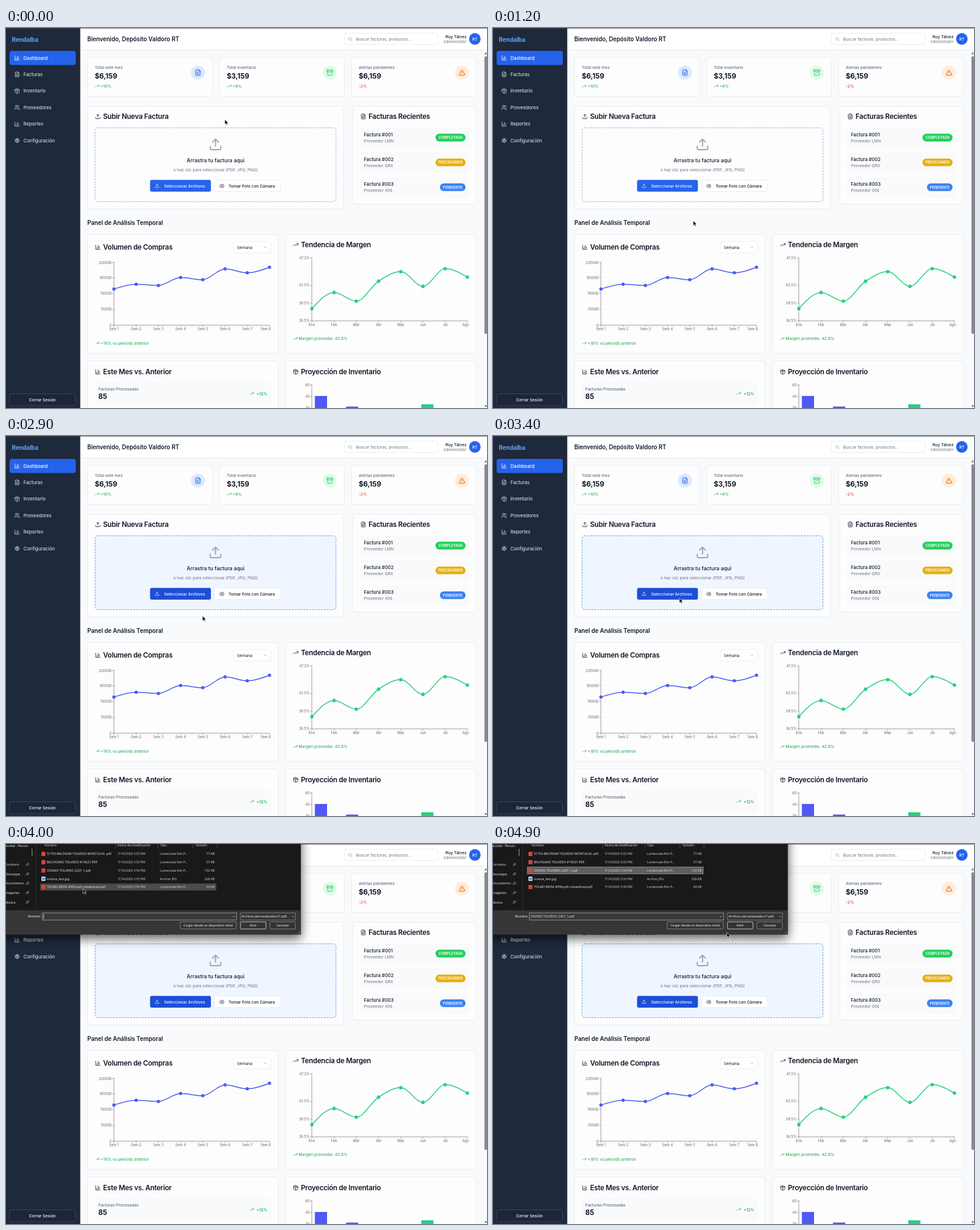
These frames come from a looping animation (800x631 px, 5 s). An HTML page:

```html
<!DOCTYPE html>
<html lang="es">
<head>
<meta charset="utf-8">
<title>Panel</title>
<style>
html, body { margin: 0; width: 100%; height: 100%; overflow: hidden; background: #f9fafb; }
svg { display: block; width: 100vw; height: 100vh; font-family: Inter, sans-serif; }
text { white-space: pre; }
#dialog { font-family: "Open Sans", "Noto Sans", sans-serif; transform-origin: 165px 20px; }
#frame { filter: drop-shadow(0 6px 9px rgba(0, 0, 0, .65)); }
</style>
</head>
<body>
<svg id="stage" viewBox="0 0 800 631"></svg>
<script>
const XS = 5.79, SM = 6.75, MD = 7.72, LG = 8.68, XL = 9.7, H = 11.58;
const INK = '#111827', GRAY = '#6b7280', LINE = '#e5e7eb', BLUE = '#2563eb', GREEN = '#16a34a';
const SERIES_BLUE = '#4a5cf0', SERIES_GREEN = '#2bd07f';

const ICONS = {
  bars: 'M3 3v18h18M18 17V9M13 17V5M8 17v-3',
  file: 'M15 2H6a2 2 0 0 0-2 2v16a2 2 0 0 0 2 2h12a2 2 0 0 0 2-2V7zM14 2v5h6M16 13H8M16 17H8M10 9H8',
  box: 'M12 22l-9-5V7l9-5 9 5v10zM3 7l9 5 9-5M12 22V12M7.5 4.3l9 5',
  users: 'M16 21v-2a4 4 0 0 0-4-4H6a4 4 0 0 0-4 4v2M13 7a4 4 0 1 1-8 0 4 4 0 0 1 8 0zM22 21v-2a4 4 0 0 0-3-3.9M16 3.1a4 4 0 0 1 0 7.8',
  gear: 'M12 9a3 3 0 1 0 0 6 3 3 0 0 0 0-6zM12 5a7 7 0 1 0 0 14 7 7 0 0 0 0-14zM12 2v3M12 19v3M2 12h3M19 12h3M5 5l2 2M17 17l2 2M5 19l2-2M17 7l2-2',
  upload: 'M21 15v4a2 2 0 0 1-2 2H5a2 2 0 0 1-2-2v-4M17 8l-5-5-5 5M12 3v12',
  camera: 'M14.5 4h-5L7 7H4a2 2 0 0 0-2 2v9a2 2 0 0 0 2 2h16a2 2 0 0 0 2-2V9a2 2 0 0 0-2-2h-3zM15 13a3 3 0 1 1-6 0 3 3 0 0 1 6 0z',
  archive: 'M2 3h20v5H2zM4 8v11a2 2 0 0 0 2 2h12a2 2 0 0 0 2-2V8M10 12h4',
  alert: 'M21.7 18l-8-14a2 2 0 0 0-3.5 0l-8 14A2 2 0 0 0 4 21h16a2 2 0 0 0 1.7-3zM12 9v4M12 17h0',
  trend: 'M22 7l-8.5 8.5-5-5L2 17M16 7h6v6',
  search: 'M19 11a8 8 0 1 1-16 0 8 8 0 0 1 16 0zM21 21l-4.3-4.3',
  down: 'M6 9l6 6 6-6'
};

const rect = (x, y, w, h, fill, stroke = 'none', r = 0, more = '') =>
  `<rect x="${x}" y="${y}" width="${w}" height="${h}" rx="${r}" fill="${fill}" stroke="${stroke}" ${more}/>`;
const text = (x, y, s, size, fill = INK, weight = 400, anchor = 'start', more = '') =>
  `<text x="${x}" y="${y}" font-size="${size}" fill="${fill}" font-weight="${weight}" text-anchor="${anchor}" ${more}>${s}</text>`;
const icon = (name, cx, cy, size, color) =>
  `<path d="${ICONS[name]}" transform="translate(${cx - size / 2} ${cy - size / 2}) scale(${size / 24})" fill="none" stroke="${color}" stroke-width="2" stroke-linecap="round" stroke-linejoin="round"/>`;
const line = (d, color, width = .6, more = '') =>
  `<path d="${d}" fill="none" stroke="${color}" stroke-width="${width}" ${more}/>`;
const dot = (x, y, r, fill) => `<circle cx="${x}" cy="${y}" r="${r}" fill="${fill}"/>`;
const card = (x, y, w, h) => rect(x, y, w, h, '#fdfdfe', LINE, 4, 'stroke-width=".8"');
const title = (x, y, s, name) =>
  icon(name, x + 4.8, y - 4, 9.65, INK) + text(x + 13.6, y, s, H, INK, 600, 'start', 'letter-spacing="-.25"');
const trend = (x, y, s) => icon('trend', x + 3.9, y - 2.4, 7.7, GREEN) + text(x + 9.6, y, s, SM, GREEN);

// Monotone cubic through evenly spaced points
function curve(xs, ys) {
  const n = ys.length, h = xs[1] - xs[0];
  const slope = ys.slice(1).map((y, i) => (y - ys[i]) / h);
  const m = ys.map((_, i) => {
    if (!i || i === n - 1) return 0;
    const a = slope[i - 1], b = slope[i];
    return a * b <= 0 ? 0 : Math.sign(a) * Math.min(Math.abs(a), Math.abs(b), Math.abs(a + b) / 4) * 2;
  });
  m[0] = (3 * slope[0] - m[1]) / 2;
  m[n - 1] = (3 * slope[n - 2] - m[n - 2]) / 2;
  let d = `M${xs[0]} ${ys[0]}`;
  for (let i = 1; i < n; i++) {
    d += `C${xs[i - 1] + h / 3} ${ys[i - 1] + m[i - 1] * h / 3} ${xs[i] - h / 3} ${ys[i] - m[i] * h / 3} ${xs[i]} ${ys[i]}`;
  }
  return d;
}

function chart({ x, top, base, ticks, labels, ys, color, r, lastShift }) {
  const xs = ys.map((_, i) => x + i * 36.96), right = xs[xs.length - 1];
  let s = '';
  for (const gx of xs.slice(1)) s += line(`M${gx} ${top}V${base}`, '#efeff1', .5, 'stroke-dasharray="1.5 1.5"');
  for (const [v, y] of ticks) {
    if (y < base - 2) s += line(`M${x} ${y}H${right}`, '#efeff1', .5, 'stroke-dasharray="1.5 1.5"');
    s += line(`M${x - 3} ${y}H${x}`, '#777') + text(x - 3.8, y + 2.1, v, XS, '#666', 400, 'end');
  }
  s += line(`M${x} ${top}V${base}H${right}`, '#777', .7);
  xs.forEach((px, i) => {
    s += line(`M${px} ${base}v3`, '#777');
    s += text(px - (i === 7 ? lastShift : 0), base + 8.4, labels[i], XS, '#666', 400, 'middle');
  });
  s += line(curve(xs, ys), color, 1.5);
  xs.forEach((px, i) => s += dot(px, ys[i], r, color));
  return s;
}

function sidebar() {
  const items = [['Dashboard', 'bars'], ['Facturas', 'file'], ['Inventario', 'box'],
    ['Proveedores', 'users'], ['Reportes', 'bars'], ['Configuración', 'gear']];
  let s = rect(0, 0, 123.5, 631, '#1e293b') + text(9.7, 22.6, 'Rendalba', XL, '#60a5fa', 700);
  s += rect(6, 38, 110, 23.4, BLUE, 'none', 4);
  items.forEach(([name, ic], i) => {
    const y = 49.7 + i * 27.43, c = i ? '#d1d5db' : '#fff';
    s += icon(ic, 18.5, y, 9.65, c) + text(29, y + 2.8, name, MD, c, 500);
  });
  return s + rect(6, 607.5, 109.5, 19.5, '#1c2638', '#475569', 3.5, 'stroke-width=".7"')
    + text(60.7, 619.7, 'Cerrar Sesión', SM, '#fff', 500, 'middle');
}

function header() {
  return rect(123.5, 0, 676.5, 36.5, '#fff') + line('M123.5 36.5H800', LINE, .7)
    + text(135.3, 21.6, 'Bienvenido, Depósito Valdoro RT', XL, INK, 600)
    + rect(562.5, 8.5, 156, 19, '#fff', '#dfe3e8', 4, 'stroke-width=".7"')
    + icon('search', 572.2, 18.2, 7.7, '#9ca3af')
    + text(582.3, 20.7, 'Buscar facturas, productos...', SM, GRAY)
    + text(766, 16.9, 'Ruy Tálvez', SM, INK, 500, 'end')
    + text(766, 25.2, 'Administrador', XS, GRAY, 400, 'end')
    + dot(779.8, 18.1, 9.6, BLUE) + text(779.8, 20.6, 'RT', SM, '#fff', 500, 'middle');
}

function stats() {
  const list = [
    [135.5, 'Total este mes', '$6,159', '+10%', '#dbeafe', 'file', BLUE],
    [355, 'Total inventario', '$3,159', '+8%', '#dcfce7', 'archive', '#22c55e'],
    [574.5, 'Alertas pendientes', '$6,159', '', '#ffedd5', 'alert', '#e2571a']];
  return list.map(([x, label, value, up, tint, ic, color]) =>
    card(x, 48.5, 207.8, 65) + text(x + 12.2, 67.6, label, SM, '#4b5563')
    + text(x + 12.2, 83.6, value, H, INK, 700)
    + (up ? trend(x + 12.2, 99, up) : text(x + 12.2, 99, '-2%', SM, '#dc2626'))
    + dot(x + 183.7, 74, 11.6, tint) + icon(ic, x + 183.7, 74, 11.6, color)).join('');
}

function upload() {
  return card(135.5, 129.5, 425.8, 171) + title(148, 151, 'Subir Nueva Factura', 'upload')
    + rect(148.2, 165.7, 400.6, 122.6, 'none', '#8db4d9', 4, 'id="zone" stroke-dasharray="2.9 1.9"')
    + icon('upload', 348.5, 193.3, 23.2, '#9ca3af')
    + text(348.5, 222.8, 'Arrastra tu factura aquí', LG, INK, 500, 'middle')
    + text(348.5, 238, 'o haz clic para seleccionar (PDF, JPG, PNG)', SM, GRAY, 400, 'middle')
    + rect(239.6, 252.2, 101.2, 19.6, BLUE, 'none', 3, 'id="pick"')
    + icon('upload', 251.3, 262, 7.7, '#fff') + text(263, 264.5, 'Seleccionar Archivos', SM, '#fff', 500)
    + rect(346.6, 252.5, 110, 19, '#fff', LINE, 3, 'stroke-width=".7"')
    + icon('camera', 359, 262, 7.7, INK) + text(370.2, 264.5, 'Tomar Foto con Cámara', SM, INK, 500);
}

function recent() {
  const rows = [['001', 'LMN', 'COMPLETADA', '#22d05c', 50], ['002', 'QRS', 'PROCESANDO', '#e5b012', 50],
    ['003', '456', 'PENDIENTE', '#3b82f6', 42.5]];
  return card(577, 129.5, 205.3, 163.3) + title(589.4, 151, 'Facturas Recientes', 'file')
    + rows.map(([id, who, state, color, w], i) => {
      const y = 182 + i * 41.2;
      return rect(589.3, y - 16.7, 180.7, 33.4, '#f9fafb', 'none', 4)
        + text(595.2, y - 2, 'Factura #' + id, MD, INK, 500) + text(595.2, y + 8, 'Proveedor ' + who, SM, GRAY)
        + rect(764.3 - w, y - 6.4, w, 12.8, color, 'none', 6.4)
        + text(764.3 - w / 2, y + 2.1, state, XS, '#fff', 600, 'middle');
    }).join('');
}

function charts() {
  let s = text(135.3, 326.8, 'Panel de Análisis Temporal', XL, INK, 600);
  s += card(135.5, 342.5, 317, 198.3) + title(148, 368, 'Volumen de Compras', 'bars')
    + rect(378, 354.5, 62.3, 19, '#fff', LINE, 3, 'stroke-width=".7"')
    + text(384, 366.6, 'Semana', SM) + icon('down', 430.7, 364, 7.7, '#888')
    + chart({ x: 179.5, top: 388.5, base: 493.5, color: SERIES_BLUE, r: 2.7, lastShift: 6.3,
      ticks: [['220000', 389.5], ['165000', 414.5], ['110000', 440.8], ['55000', 467.2], ['0', 493.5]],
      labels: [1, 2, 3, 4, 5, 6, 7, 8].map(n => 'Sem ' + n),
      ys: [433.5, 425.5, 427.5, 414.3, 418, 400, 406.4, 397.2] })
    + trend(147.9, 526, '+18% vs periodo anterior');
  s += card(464.8, 342.5, 317.5, 198.3) + title(477, 364, 'Tendencia de Margen', 'trend')
    + chart({ x: 508.7, top: 380.5, base: 486.3, color: SERIES_GREEN, r: 2.9, lastShift: 3,
      ticks: [['47.2%', 381.5], ['42.5%', 427], ['39.5%', 456.6], ['36.5%', 486]],
      labels: ['Ene', 'Feb', 'Mar', 'Abr', 'May', 'Jun', 'Jul', 'Ago'],
      ys: [466, 439.2, 453.6, 420.5, 404.6, 429, 399.6, 413.6] })
    + trend(477, 518.4, 'Margen promedio: 42.8%');
  s += card(135.5, 552.7, 317, 100) + title(148, 574.8, 'Este Mes vs. Anterior', 'bars')
    + rect(148, 587.7, 293, 39, '#f9fafb', 'none', 4)
    + text(153.5, 601.8, 'Facturas Procesadas', SM, '#4b5563') + text(153.5, 615.8, '85', H, INK, 700)
    + icon('trend', 408.5, 607, 7.7, GREEN) + text(434.8, 609.5, '+12%', SM, GREEN, 500, 'end');
  s += card(464.8, 552.7, 317.5, 100) + title(477, 574.8, 'Proyección de Inventario', 'box');
  for (const [v, y] of [['60', 592.5], ['45', 611.5], ['30', 631]]) {
    s += line(`M508.7 ${y}H768`, '#efeff1', .5, 'stroke-dasharray="1.5 1.5"')
      + line(`M505.7 ${y}h3`, '#777') + text(504.9, y + 2.1, v, XS, '#666', 400, 'end');
  }
  return s + line('M508.7 591.5V631', '#777', .7) + rect(513.7, 611, 20.3, 20, '#5258f7')
    + rect(565.5, 628.6, 20.3, 3, '#5258f7') + rect(690.6, 624.8, 20.3, 7, SERIES_GREEN);
}

const scrollbar = () => rect(794, 37, 6, 594, '#fafafa') + rect(795.7, 47, 4.6, 461, '#8a8a8a', 'none', 2.3)
  + '<path d="M795.5 43.5l2.3-3.5 2.3 3.5zM795.5 626.5l2.3 3.5 2.3-3.5z" fill="#777"/>';

const D = 5.25, PICKED = 'OSVINO TOLVEDO 2207_1.pdf';
const rowY = i => 16.4 + i * 13.75;

function dialog() {
  const files = [['51753-BALTASAR TOLVEDO-MONTULAS .pdf', '3:53', '77 KB'], ['BALTASARO TOLVEDO #19027.PDF', '3:53', '57 KB'],
    [PICKED, '3:54', '152 KB'], ['invoice_test.jpg', '3:53', '328 KB'], ['TOLMO BRISA #956.pdf.crdownload.pdf', '3:54', '44 KB']];
  const t = (x, y, s, c = '#f2f2f2', a = 'start') => text(x, y, s, D, c, 400, a);
  const button = (x, w, s, edge) => rect(x, 129.3, w, 11.8, '#333', edge, 1.2, 'stroke-width=".8"')
    + t(x + w / 2, 137, s, '#fff', 'middle');
  let s = rect(-40, -60, 530.5, 210.5, '#363636', 'none', 0, 'id="frame"')
    + rect(-40, -60, 530, 170, '#191919') + line('M49.3 0V110', '#3c3c3c', .7) + line('M43.3 8V20', '#a0a0a0', 1);
  s += t(-1.5, 4.6, 'Norbel - Person');
  ['Escritorio', 'Descargas', 'Documentos', 'Imágenes', 'Música'].forEach((n, i) => {
    const y = 34.3 + i * 15.6;
    s += t(-1.5, y + 1.9, n) + line(`M33 ${y + 2.2}l2-2m-1.2-1.2l2.6 2.6m-1.6-2.6l1.8-1.6 1.6 1.6-1.6 1.8`, '#bdbdbd', .8);
  });
  [[64, 'Nombre'], [185.8, 'Fecha de modificación'], [256.5, 'Tipo'], [315, 'Tamaño']].forEach(([x, n]) => s += t(x, 4.2, n, '#dedede'));
  [182.5, 253, 311, 351].forEach(x => s += line(`M${x} 0V7.5`, '#666'));
  s += rect(57, 0, 292.7, 11.6, '#4b4b4b', 'none', 0, 'id="hover"')
    + rect(57, rowY(2) - 5.8, 292.7, 11.6, '#5f5f5f', '#a8a8a8', 0, 'id="chosen" stroke-width=".7"');
  files.forEach(([name, time, size], i) => {
    const y = rowY(i), jpg = i === 3;
    s += rect(59, y - 3.5, 6.5, 7, jpg ? '#e8eef5' : '#d6453d', 'none', .6)
      + (jpg ? rect(60.2, y - 1.5, 4.2, 3.4, '#3b82d0') : '')
      + t(68, y + 2, name) + t(185.8, y + 2, `7/14/2025 ${time} PM`, '#dcdcdc')
      + t(256, y + 2, jpg ? 'Archivo JPG' : 'Lumenvale Rim P...', '#dcdcdc') + t(347, y + 2, size, '#dcdcdc', 'end');
  });
  const chev = x => line(`M${x} 119.5l1.8 1.8 1.8-1.8`, '#ccc', .7);
  s += t(58, 122.2, 'Nombre:', '#fff', 'end') + rect(60.5, 114.6, 323, 11.6, '#383838', '#a5a5a5', 0, 'stroke-width=".8"')
    + line('M62.6 116.3V124.5', '#fff', .7, 'id="caret"') + `<g id="typed">${t(62.5, 122.3, PICKED)}</g>` + chev(377.3)
    + rect(390, 114.6, 91.5, 11.6, '#333', '#8c8c8c', 0, 'stroke-width=".8"')
    + t(391.8, 122.3, 'Archivos personalizados (*.pdf;', '#fff') + chev(475.5)
    + button(289.8, 93.2, 'Cargar desde un dispositivo móvil', '#999') + button(390, 42.3, 'Abrir', '#e8e8e8')
    + button(439, 42.3, 'Cancelar', '#999');
  [[488, 148], [486, 148], [488, 146]].forEach(([x, y]) => s += rect(x - .5, y - .5, 1, 1, '#aaa'));
  return `<g id="dialog">${s}</g>`;
}

document.getElementById('stage').innerHTML = rect(0, 0, 800, 631, '#f9fafb') + header() + stats() + upload()
  + recent() + charts() + scrollbar() + sidebar() + rect(0, 0, 800, .7, '#444') + dialog()
  + '<path id="cursor" d="M0 0V8.2l1.9-1.8 1.3 2.9 1.4-.6-1.3-2.8h2.6z" fill="#000" stroke="#fff" stroke-width=".6"/>';

const el = id => document.getElementById(id);
const show = (id, on) => el(id).setAttribute('visibility', on ? 'inherit' : 'hidden');

const LOOP = 5000, STEP = 100, CLICK = 1700, OPEN = 3500, CHOOSE = 4400;
const PATH = [[0, 364, 152], [200, 364, 152], [900, 333, 320], [1300, 333, 320], [1600, 302, 265], [1800, 302, 265],
  [2200, 336, 315], [2700, 336, 315], [3200, 310, 269], [3600, 310, 269], [4000, 128, 74], [4300, 112, 45],
  [4500, 112, 45], [4900, 389, 147], [5000, 389, 147]];

function cursorAt(t) {
  const i = PATH.findIndex((p, k) => k && t <= p[0]);
  const [t0, x0, y0] = PATH[i - 1], [t1, x1, y1] = PATH[i];
  const u = (t - t0) / (t1 - t0), e = u * u * (3 - 2 * u);
  return [x0 + (x1 - x0) * e, y0 + (y1 - y0) * e];
}

function draw(t) {
  const [x, y] = cursorAt(t);
  const over = (l, top, r, b) => x > l && x < r && y > top && y < b;
  // The page keeps its hover look once the button has been clicked
  const zone = t >= CLICK || over(148, 165, 549, 289);
  const pick = t >= CLICK || over(239, 252, 341, 272);
  el('cursor').setAttribute('transform', `translate(${x} ${y})`);
  el('zone').setAttribute('fill', zone ? '#eff6ff' : 'none');
  el('zone').setAttribute('stroke', zone ? '#5b9be0' : '#8db4d9');
  el('pick').setAttribute('fill', pick ? '#1d4ed8' : BLUE);

  const open = t > OPEN, grow = Math.min(1, (t - OPEN) / 200);
  show('dialog', open);
  el('dialog').style.transform = `scale(${1 - .032 * (1 - grow) ** 2})`;
  const row = Math.floor((y - 9.6) / 13.75);
  show('hover', open && over(57, 9.6, 350, 78));
  el('hover').setAttribute('y', rowY(row) - 5.8);
  show('chosen', open && t >= CHOOSE);
  show('typed', open && t >= CHOOSE);
  show('caret', open && t < CHOOSE);
}

const start = performance.now();
function tick() {
  const t = (performance.now() - start) % LOOP;
  draw(Math.floor(t / STEP) * STEP);
  requestAnimationFrame(tick);
}
tick();
</script>
</body>
</html>
```
